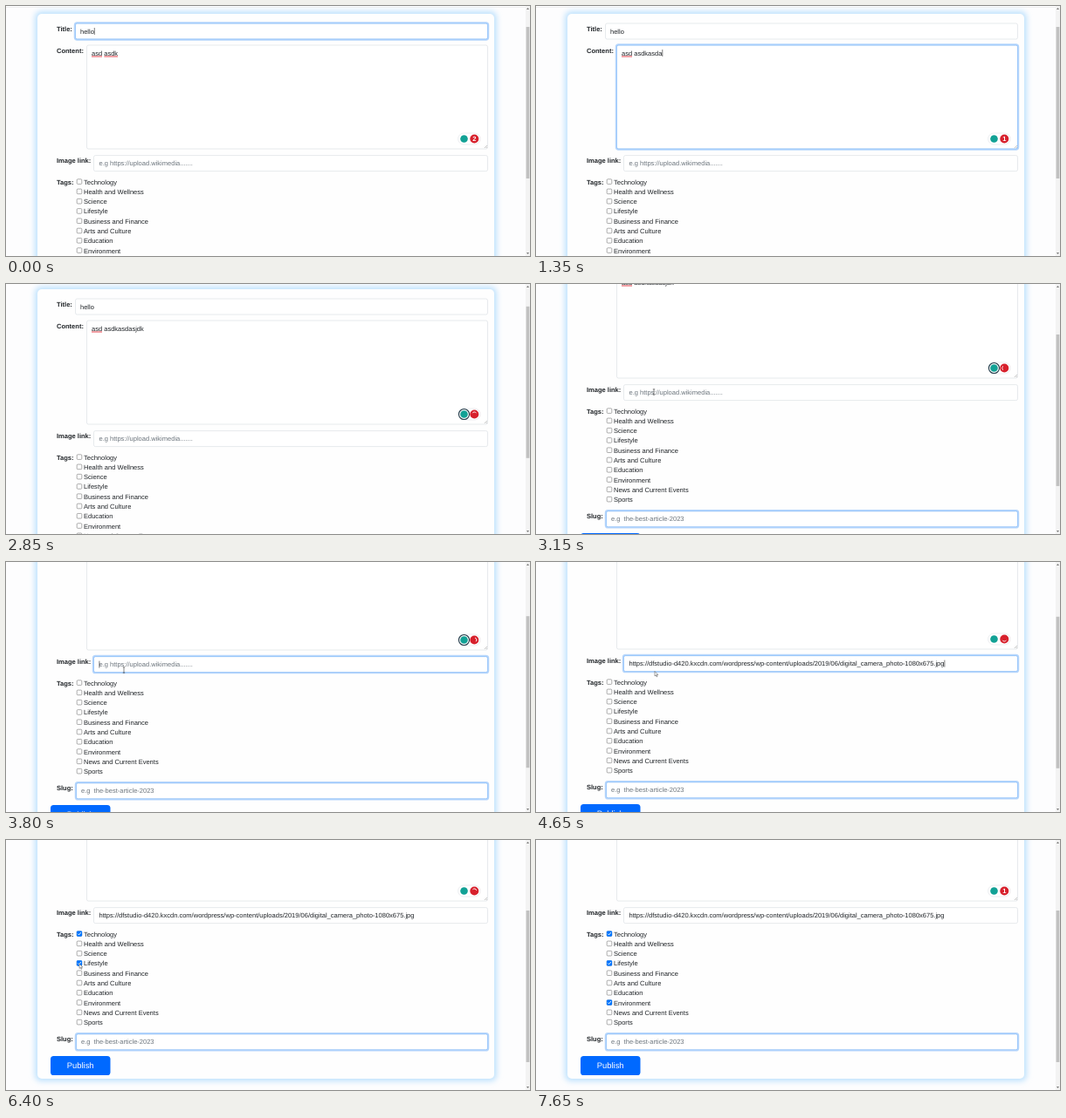
Animation of 600 by 287 pixels, one loop 8000 ms. Source, as an HTML page:

```html
<!DOCTYPE html>
<html lang="en">
<head>
<meta charset="utf-8">
<title>Article form</title>
<style>
html, body { margin: 0; height: 100%; overflow: hidden; background: #fdfdfe; }
svg { display: block; width: 600px; height: 287px; }
text { font: 7.52px "Liberation Sans", Arial, sans-serif; fill: #212529; text-rendering: geometricPrecision; white-space: pre; }
.label { font-weight: bold; }
.hint { fill: #6c757d; }
.field { fill: #fff; stroke: #ced4da; stroke-width: .5; }
.ring { fill: none; stroke: #b7d6fb; stroke-width: 1.9; }
.edge { fill: none; stroke: #80bdff; stroke-width: .6; }
.box { fill: #fff; stroke: #767676; stroke-width: .6; }
.typo { stroke: #e5303a; stroke-width: .9; }
</style>
</head>
<body>
<svg viewBox="0 0 600 287">
  <defs><filter id="glow" x="-10%" y="-10%" width="120%" height="120%"><feGaussianBlur stdDeviation="3"/></filter></defs>
  <g id="page">
    <path d="M0 1.5H595" stroke="#f0f0f1"/>
    <rect x="33" y="6" width="529" height="365" rx="7" fill="#bfe2fd" filter="url(#glow)"/>
    <rect x="36" y="9" width="523" height="359" rx="5" fill="#fefefe"/>
  </g>
  <rect x="595" width="5" height="287" fill="#f3f3f3"/>
  <path d="M596 4l1.5-2 1.5 2zM596 283l1.5 2 1.5-2z" fill="#777"/>
  <rect id="thumb" x="595.6" width="3.8" height="174" fill="#c1c1c1"/>
  <path id="arrow" d="M0 0V5.4L1.3 4.3 2.2 6.3 3 5.9 2.1 4H3.8Z" fill="#fff" stroke="#444" stroke-width=".5"/>
  <path id="beam" d="M-1.2-3.2H1.2M0-3.2V3.2M-1.2 3.2H1.2" stroke="#333" stroke-width=".6"/>
</svg>
<script>
const LOOP = 8000;
const $ = id => document.getElementById(id);
const page = $("page");

function add(tag, attrs, text = "", parent = page) {
  const el = document.createElementNS("http://www.w3.org/2000/svg", tag);
  for (const k in attrs) el.setAttribute(k, attrs[k]);
  el.textContent = text;
  return parent.appendChild(el);
}

// y is the middle of the capital letters
const write = (x, y, str, cls = "") => add("text", { x, y: y + 2.6, class: cls }, str);
const show = (el, on) => el.setAttribute("opacity", +on);
const move = (el, x, y) => el.setAttribute("transform", `translate(${x} ${y})`);

function field(x, y, h) {
  const box = (cls, grow) => add("rect", {
    x: x - grow, y: y - grow, width: 551.5 - x + 2 * grow, height: h + 2 * grow, rx: 1.9 + grow, class: cls
  });
  box("field", 0);
  return [box("ring", .8), box("edge", 0)];
}

function tag(name, i) {
  const y = 202 + 11.28 * i;
  write(89, y, name);
  add("rect", { x: 81.2, y: y - 3.2, width: 5.6, height: 5.6, rx: 1, class: "box" });
  const mark = add("g", {});
  add("rect", { x: 80.9, y: y - 3.5, width: 6.2, height: 6.2, rx: 1.1, fill: "#0075ff" }, "", mark);
  add("path", { d: `M82.2 ${y - .4}l1.3 1.4 2.4-2.9`, fill: "none", stroke: "#fff", "stroke-width": .9 }, "", mark);
  return mark;
}

[["Title:", 26], ["Content:", 51], ["Image link:", 177], ["Tags:", 202], ["Slug:", 322]]
  .forEach(([name, y]) => write(58, y, name, "label"));

const titleRing = field(79.5, 20, 18);
const bodyRing = field(92.5, 45, 119);
const linkRing = field(100.5, 171.6, 18);
field(80.5, 316.8, 18);
add("path", { d: "M548 163l3-3M550 163l1-1", stroke: "#888", "stroke-width": .5 });

const title = write(85, 29, "hello");
const body = write(98, 54, "");
const link = write(106.5, 180.6, "");
write(86, 325.6, "e.g \u00a0the-best-article-2023", "hint");
const typos = [[98, 110], [112.4, 128]].map(([a, b]) => add("path", { d: `M${a} 58H${b}`, class: "typo" }));
const caret = add("path", { d: "M0-4V4", stroke: "#222", "stroke-width": .6 });

const marks = ["Technology", "Health and Wellness", "Science", "Lifestyle", "Business and Finance",
  "Arts and Culture", "Education", "Environment", "News and Current Events", "Sports"].map(tag);
const checks = [[0, 5800], [3, 6350], [7, 7350]];

add("rect", { x: 51, y: 342, width: 68.5, height: 22, rx: 3.6, fill: "#0069ff" });
add("text", { x: 85.2, y: 356.4, "text-anchor": "middle", style: "font-size:9.4px;fill:#fff" }, "Publish");

// Writing helper badge
add("rect", { x: 517.6, y: 146, width: 25.4, height: 13, rx: 6.5, fill: "#fff", stroke: "#e4e6ea", "stroke-width": .7 });
add("circle", { cx: 524.5, cy: 152.5, r: 4.3, fill: "#12a195" });
const halo = add("circle", { cx: 524.5, cy: 152.5, r: 6, fill: "none", stroke: "#213c49", "stroke-width": 1.1 });
add("circle", { cx: 536.3, cy: 152.5, r: 5, fill: "#d7202c" });
const count = add("text", { x: 536.3, y: 155.2, "text-anchor": "middle", style: "font-weight:bold;fill:#fff" });
const spinner = add("path", { d: "M-2.2-1.3A2.55 2.55 0 0 1 2.2-1.3", fill: "none", stroke: "#fff", "stroke-width": .9 });

const scrolls = [[2800, 0], [2850, 3], [2950, 20], [3000, 20], [3050, 36], [3100, 49], [3150, 56], [3250, 56],
  [3400, 61], [3850, 63], [4000, 64], [4750, 64], [4850, 70], [5000, 85], [5150, 92], [5250, 94]];
const pointer = [[3100, 135, 124], [3900, 135, 124], [4200, 136, 125.5], [4750, 136, 125.5], [5100, 101, 109],
  [5500, 101, 109], [5750, 84, 108], [5900, 84, 108], [6250, 84, 142]];
const keys = [1050, 1100, 1200, 1350, 1450, 1450, 1500, 1600];

const clamp = v => Math.max(0, Math.min(1, v));
const between = (t, a, b) => t >= a && t < b;
const focus = (t, on, off) => clamp((t - on) / 150) - clamp((t - off) / 150);

function along(path, t) {
  const i = path.findIndex(p => p[0] > t);
  if (i < 0) return path[path.length - 1].slice(1);
  if (!i) return path[0].slice(1);
  const a = path[i - 1], b = path[i], k = (t - a[0]) / (b[0] - a[0]);
  return a.slice(1).map((v, n) => v + (b[n + 1] - v) * k);
}

function draw(now) {
  const t = now % LOOP;
  const scroll = Math.round(along(scrolls, t)[0]);
  move(page, 0, -scroll);
  $("thumb").setAttribute("y", 24 + .606 * scroll);

  const rings = [[titleRing, -200, 400], [bodyRing, 450, 1800], [linkRing, 3450, 5650]];
  for (const [ring, on, off] of rings) ring.forEach(el => show(el, focus(t, on, off)));

  body.textContent = "asd asdk" + "asdasjdk".slice(0, keys.filter(k => k <= t).length);
  const pasted = t >= 4150;
  link.textContent = pasted
    ? "https://dfstudio-d420.kxcdn.com/wordpress/wp-content/uploads/2019/06/digital_camera_photo-1080x675.jpg"
    : "e.g https://upload.wikimedia.......";
  link.setAttribute("class", pasted ? "" : "hint");
  show(typos[1], t < 1050);

  const active = t < 400 ? title : between(t, 450, 1800) ? body : between(t, 3450, 5650) ? link : null;
  show(caret, active);
  if (active) {
    const end = active === link && !pasted ? 0 : active.getComputedTextLength();
    move(caret, +active.getAttribute("x") + end + .4, active.getAttribute("y") - 2.6);
  }

  for (const [i, at] of [...marks.keys()].map(i => [i, (checks.find(c => c[0] === i) || [0, LOOP])[1]]))
    show(marks[i], t >= at);

  const busy = between(t, 2150, 7200);
  count.textContent = busy ? "" : t < 1050 ? "2" : "1";
  show(spinner, busy);
  spinner.setAttribute("transform", `translate(536.3 152.5) rotate(${(2850 - t) * .3})`);
  show(halo, between(t, 2150, 3900));

  const [x, y] = along(pointer, t);
  move($("beam"), x, y);
  move($("arrow"), x, y);
  show($("beam"), between(t, 3100, 4100));
  show($("arrow"), between(t, 4100, 6450));
}

const start = performance.now();
(function tick() {
  draw(performance.now() - start);
  requestAnimationFrame(tick);
})();
</script>
</body>
</html>
```
